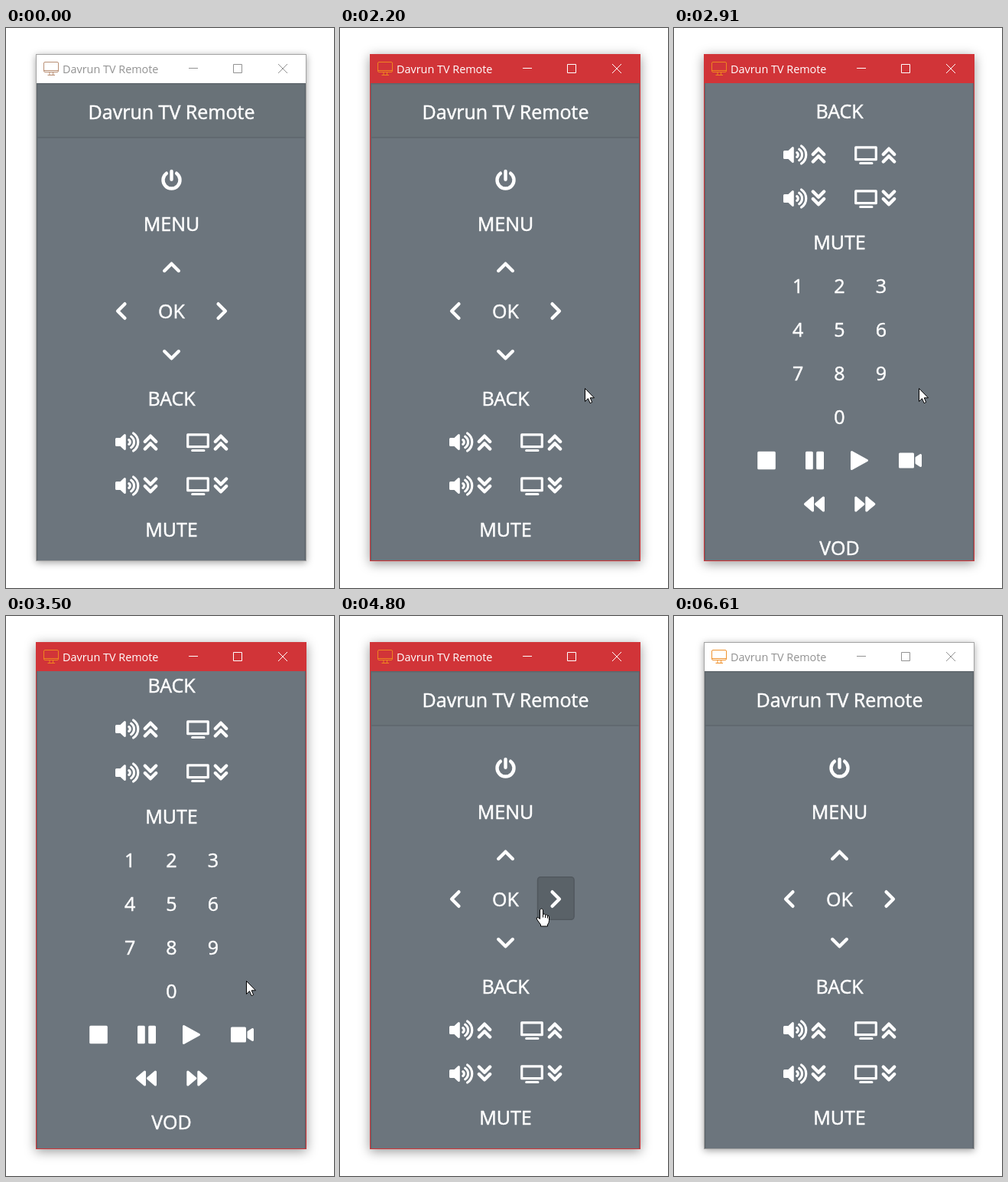
Animation of 429x731 px, one loop 6.66 s. Source, as an HTML page:

```html
<!DOCTYPE html>
<html lang="en">
<head>
<meta charset="utf-8">
<title>Davrun TV Remote</title>
<style>
html, body { margin: 0; width: 100%; height: 100%; overflow: hidden; background: #fff; }
#win {
  position: absolute; left: 39px; top: 34px; width: 354px; height: 662px;
  box-sizing: border-box; background: #fff; border: 1px solid #a3a3a3;
  box-shadow: 0 2px 9px rgba(0,0,0,.36);
  --ink: #929292; --icon: #b98f74;
}
#win.late { --icon: #f0932f; }
#win.active {
  background: #d13438; border-color: #d13438;
  box-shadow: 0 3px 14px rgba(0,0,0,.4);
  --ink: #fff; --icon: #ee8420;
}
svg { position: absolute; left: -40px; top: -35px; width: 429px; height: 731px; overflow: visible; }
text { font-family: "Open Sans", "Noto Sans", sans-serif; }
.label { font-size: 25px; fill: #fff; stroke: #fff; stroke-width: .5; text-anchor: middle; }
.title { font-size: 14.4px; fill: var(--ink); }
.bar { fill: none; stroke: var(--ink); }
.app { fill: none; stroke: var(--icon); }
.line { fill: none; stroke: #fff; stroke-width: 4.4; stroke-linecap: round; stroke-linejoin: round; }
.thin { stroke-width: 3.2; }
.solid { fill: #fff; stroke: #fff; stroke-width: 3; stroke-linejoin: round; }
.hover { fill: #5a6268; stroke: #51585e; stroke-width: 1.5; }
.cursor { fill: #fff; stroke: #000; stroke-linejoin: round; }
</style>
</head>
<body>
<div id="win">
<svg viewBox="0 0 429 731">
  <defs><clipPath id="view"><rect x="40" y="72" width="352" height="623"/></clipPath></defs>
  <g class="app">
    <rect x="49.5" y="44.5" width="19" height="13" rx="1.5"/>
    <path d="M50 55.5H68.5M57 58V61M61.5 58V61M54.5 61.5H64"/>
  </g>
  <text class="title" x="74" y="59">Davrun TV Remote</text>
  <path class="bar" d="M239 52.5H251M297.5 47.5H308.5V58.5H297.5ZM356 47L368 59M368 47L356 59"/>
  <g clip-path="url(#view)">
    <rect x="40" y="72" width="352" height="623" fill="#6c757d"/>
    <g id="page">
      <rect x="41" y="72" width="351" height="71" fill="#697278"/>
      <path d="M41 72.7H392M41 143H392" stroke="#5e666c" stroke-width="1.6"/>
      <text class="label" x="216.5" y="119">Davrun TV Remote</text>
    </g>
    <path d="M40.7 72V696M391.3 72V696" stroke="#5f676d" stroke-width="1.4"/>
  </g>
  <g id="cursor" class="cursor">
    <path id="arrow" d="M0 0V17L4 13.2 6.6 19.2 9.2 18 6.7 12.3H12Z"/>
    <path id="hand" d="M-2 2Q0-1 2 2V8Q4 6.6 5 8.6 7 7.6 8 9.6 10 9 10 11.5V16Q10 19 8 21.5V23.5H-1V21.5L-6 14.5Q-7.3 11.5-4.6 12L-2 14ZM2 8v4M5 8.6v4M8 9.6v3.5"/>
  </g>
</svg>
</div>
<script>
const LOOP = 6660, ENTER = 410, FOCUS = 850, LEAVE = 5820, BLUR = 6610;
const FADE = 150, STEP = 50, MID = 216.5, ROW = 57;
const $ = id => document.getElementById(id);
const page = $("page"), buttons = [];

function add(parent, tag, attrs, text) {
  const el = document.createElementNS("http://www.w3.org/2000/svg", tag);
  for (const k in attrs) el.setAttribute(k, attrs[k]);
  if (text) el.textContent = text;
  return parent.appendChild(el);
}

// Icons are drawn around the centre of their button.
const label = s => g => add(g, "text", { class: "label", y: 9 }, s);
const line = (d, thin = "") => g => add(g, "path", { class: "line " + thin, d });
const solid = d => g => add(g, "path", { class: "solid", d });
const all = (...parts) => g => parts.forEach(p => p(g));
const block = (x, w) => `M${x}-10.2h${w}v20.4h${-w}Z`;
const wedge = (x, d) => `M${x} 0l${10 * d}-8.5v17Z`;
const upDown = d => `M-9.3 ${4.5 * d}L0 ${-4.8 * d}L9.3 ${4.5 * d}`;
const side = d => `M${-4.7 * d}-9.3L${4.6 * d} 0L${-4.7 * d} 9.3`;
const twin = (x, d) => [0, 9.5].map(o =>
  `M${x - 7.2} ${d * (o - .5)}L${x} ${d * (o - 7.8)}l7.2 ${d * 7.3}`).join("");
const wave = r => `M${-11.7 + r * .56} ${-r * .83}a${r} ${r} 0 0 1 0 ${r * 1.66}`;

const volume = d => all(
  solid("M-26-4H-20.5L-15.2-9V9L-20.5 4H-26Z"),
  line([3.5, 8.7, 13.9].map(wave).join(""), "thin"),
  line(twin(18.5, d)));
const screen = d => all(
  line("M-25.8-9.6h26.6v15.8h-26.6ZM-19.8 11h15.2", "thin"),
  line(twin(17.5, d)));

function button(row, x, w, paint) {
  const y = 197.5 + ROW * row;
  const box = add(page, "rect", { class: "hover", rx: 4, x: x - w / 2 + .7, y: y - 27.8, width: w - 1.4, height: ROW - 1.4 });
  paint(add(page, "g", { transform: `translate(${x} ${y + 1})` }));
  buttons.push({ x, y, w, box });
}
button(0, MID, 59, all(
  line("M-6.6-8.8A11 11 0 1 0 6.6-8.8"), line("M0-11.6V-.8")));
button(1, MID, 106, label("MENU"));
button(2, MID, 56, line(upDown(1)));
button(3, 150.7, 49, line(side(-1)));
button(3, MID, 67, label("OK"));
button(3, 282.3, 49, line(side(1)));
button(4, MID, 56, line(upDown(-1)));
button(5, MID, 95, label("BACK"));
[1, -1].forEach((d, i) => {
  button(6 + i, 170.5, 87, volume(d));
  button(6 + i, 263.5, 87, screen(d));
});
button(8, MID, 100, label("MUTE"));
for (let n = 0; n < 9; n++)
  button(9 + Math.floor(n / 3), MID + (n % 3 - 1) * 54.4, 47, label(String(n + 1)));
button(12, MID, 47, label("0"));
button(13, 121, 56, solid(block(-10.3, 20.6)));
button(13, 184, 56, solid(block(-10.5, 6.8) + block(3.7, 6.8)));
button(13, 241.2, 57, solid("M-8.7-11L11.3 0L-8.7 11Z"));
button(13, 309, 62, solid("M-13.5-8.5h17v17h-17ZM8-3.5L13.5-7V7L8 3.5Z"));
button(14, 183.5, 59, solid(wedge(-12, 1) + wedge(2, 1)));
button(14, 249.8, 59, solid(wedge(12, -1) + wedge(-2, -1)));
button(15, MID, 86, label("VOD"));

// Pointer stops: time, x, y
const stops = [
  [410, 408, 600], [950, 214, 200], [1085, 205, 190], [1110, 189, 130], [1220, 189, 130],
  [1730, 215, 422], [1780, 215, 422], [1920, 190, 530], [1960, 190, 530], [2060, 312, 474],
  [2150, 321, 470], [3440, 321, 470], [3700, 238, 546], [3960, 170, 549], [4055, 238, 525],
  [4085, 281, 452], [4400, 281, 452], [4600, 264, 381], [4830, 264, 381], [4970, 231, 375],
  [5340, 231, 375], [5810, 425, 545]
];
// Times of the wheel notches
const down = [2330, 2520, 2710, 3110], up = [4130, 4280, 4430, 4580];
const NOTCH = 125, MAX = 393;

const clamp = v => Math.max(0, Math.min(1, v));
const smooth = v => v * v * (3 - 2 * v);
const travel = (times, t) => times.reduce((sum, start, i) =>
  sum + Math.min(NOTCH, MAX - NOTCH * i) * smooth(clamp((t - start) / 170)), 0);
const scroll = t => travel(down, t) - travel(up, t);

function pointer(t) {
  const i = stops.findIndex(s => s[0] > t);
  if (i < 1) return stops[i ? stops.length - 1 : 0].slice(1);
  const [t0, x0, y0] = stops[i - 1], [t1, x1, y1] = stops[i];
  const p = (t - t0) / (t1 - t0);
  return [x0 + (x1 - x0) * p, y0 + (y1 - y0) * p];
}
function hit(b, t) {
  if (t < ENTER || t >= LEAVE) return false;
  const [x, y] = pointer(t);
  return Math.abs(x - b.x) < b.w / 2 && Math.abs(y + scroll(t) - b.y) < ROW / 2;
}
// A linear fade equals the share of the last FADE ms spent on the button.
function glow(b, t) {
  const n = 6;
  let sum = 0;
  for (let k = 0; k < n; k++) sum += hit(b, t - k * FADE / n);
  return sum / n;
}

function draw(now) {
  const t = now % LOOP;
  const s = Math.floor((t - 10) / STEP) * STEP + 10;
  $("win").className = t >= BLUR ? "late" : t >= FOCUS ? "active" : "";
  page.setAttribute("transform", `translate(0 ${-Math.round(scroll(s))})`);
  for (const b of buttons) b.box.setAttribute("opacity", glow(b, s));

  const hand = buttons.some(b => hit(b, s));
  const [x, y] = pointer(s).map(Math.round);
  $("cursor").setAttribute("transform", `translate(${x - .5} ${y + .5})`);
  $("cursor").style.display = t >= ENTER && t < LEAVE ? "" : "none";
  $("hand").style.display = hand ? "" : "none";
  $("arrow").style.display = hand ? "none" : "";
}

const start = performance.now();
function tick() {
  draw(performance.now() - start);
  requestAnimationFrame(tick);
}
tick();
</script>
</body>
</html>
```
